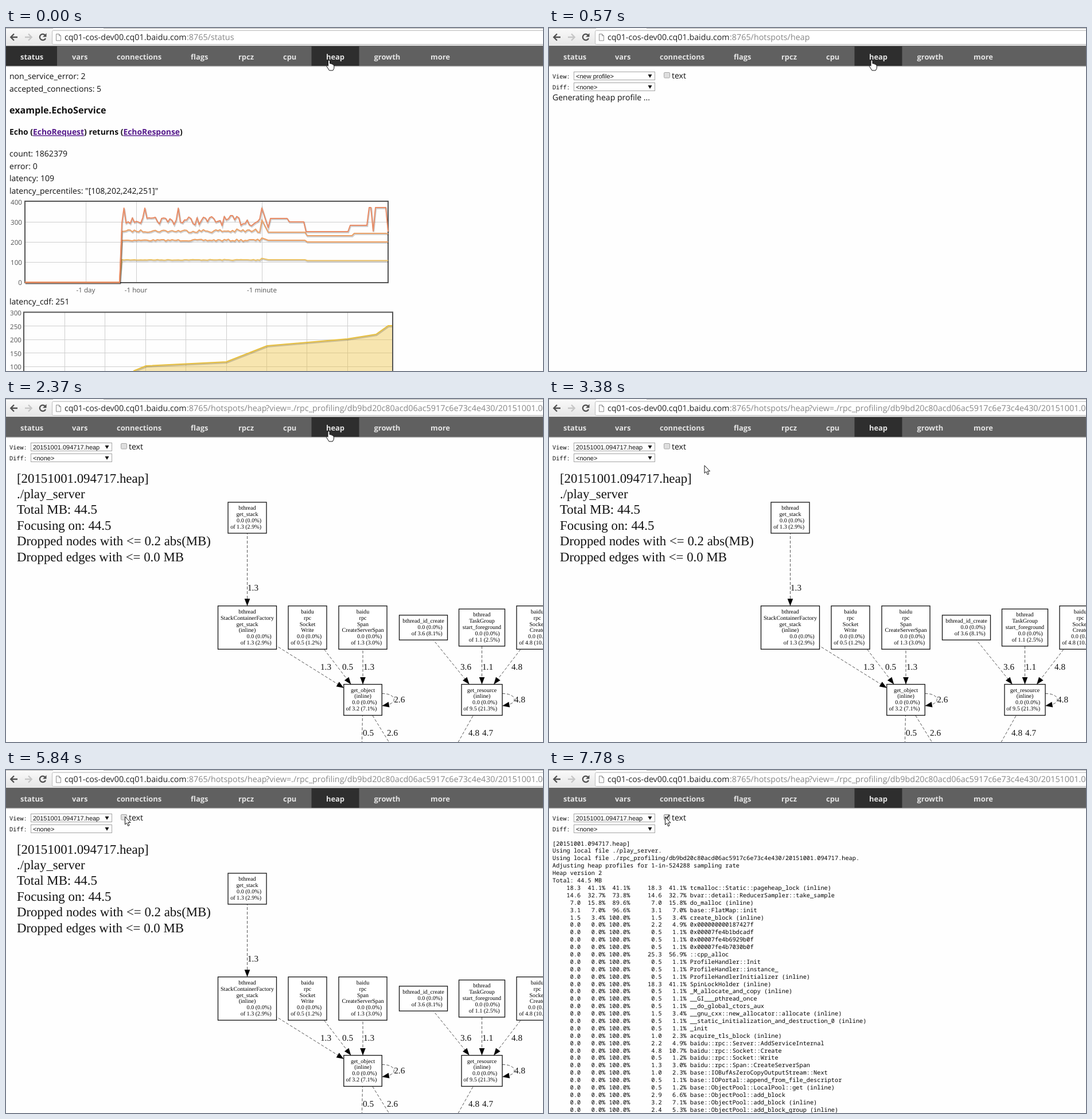
Animation, 936 px wide and 598 px high, one loop 8 s. Source, as an HTML page:

```html
<!DOCTYPE html>
<html lang="en">
<head>
<meta charset="utf-8">
<title>Heap profiler</title>
<style>
html, body { margin: 0; width: 100%; height: 100%; overflow: hidden; background: #fefefe; }
svg { position: absolute; left: 0; top: 0; }
text, pre { text-rendering: geometricPrecision; white-space: pre; }
text { font: 14.05px "Open Sans", "Noto Sans", sans-serif; fill: #111; }
text.url { font-size: 14.25px; fill: #222; }
text.path { font-size: 14.35px; fill: #868686; }
text.nav { font-size: 12.9px; font-weight: 700; fill: #e4e4e4; }
text.h3 { font-size: 16.1px; font-weight: 700; }
text.h4 { font-size: 13.9px; font-weight: 700; }
text.tick { font-size: 11.6px; fill: #545454; }
text.sel { font: 11px "Liberation Sans", Arial, sans-serif; }
text.title { font: 22.85px "Liberation Serif", Times, serif; }
text.node { font: 10.1px "Liberation Serif", Times, serif; fill: #000; }
text.edge { font: 15.2px "Liberation Serif", Times, serif; }
text.mono, pre { font: 10.25px/12.89px "Noto Sans Mono", "DejaVu Sans Mono", monospace; color: #000; }
pre { position: absolute; left: 6px; top: 122.6px; margin: 0; }
.link { fill: #551a8b; text-decoration: underline; }
.end { text-anchor: end; }
.mid { text-anchor: middle; }
</style>
</head>
<body>
<svg id="stage" width="936" height="598"></svg>
<pre id="report">[20151001.094717.heap]
Using local file ./play_server.
Using local file ./rpc_profiling/db9bd20c80acd06ac5917c6e73c4e430/20151001.094717.heap.
Adjusting heap profiles for 1-in-524288 sampling rate
Heap version 2
Total: 44.5 MB
</pre>
<svg id="top" width="936" height="598"></svg>
<script>
const $ = id => document.getElementById(id);
const text = (x, y, s, cls = '') => `<text x="${x}" y="${y}" class="${cls}">${s}</text>`;
const rect = (x, y, w, h, fill, more = '') =>
  `<rect x="${x}" y="${y}" width="${w}" height="${h}" fill="${fill}" ${more}/>`;
const path = (d, stroke, width = 1, more = '') =>
  `<path d="${d}" fill="none" stroke="${stroke}" stroke-width="${width}" ${more}/>`;
const group = (id, ...parts) => `<g id="${id}">${parts.flat().join('')}</g>`;
const poly = pts => 'M' + pts.map(p => p.map(v => +v.toFixed(1)).join(' ')).join('L');
const range = (n, f) => Array.from({ length: n }, (_, i) => f(i));

let seed = 7;
const noise = amp => {
  seed = (seed * 16807) % 2147483647;
  return (seed / 2147483647 * 2 - 1) * amp;
};

// Browser toolbar and page menu
const TABS = { status: 25, vars: 115, connections: 193, flags: 322, rpcz: 405,
  cpu: 483, heap: 558, growth: 641.5, more: 740 };
const toolbar = [
  '<linearGradient id="bar" x2="0" y2="1"><stop stop-color="#fafafa"/><stop offset="1" stop-color="#e6e6e6"/></linearGradient>',
  rect(0, 0, 936, 31, 'url(#bar)'),
  path('M0 .5H82M170 .5H936', '#b4b4b4'),
  rect(80.5, 4.5, 870, 24, '#fff', 'rx="2" stroke="#bcbcbc"'),
  path('M20 16H9M14 10.3L8.3 16l5.7 5.7', '#505050', 2.3),
  path('M33 16H44M39 10.3L44.7 16 39 21.7', '#c6c6c6', 2.3),
  group('reload', path('M68.3 12.6A5.3 5.3 0 1 0 69 18', '#505050', 2.3),
    '<path d="M70.5 9v6.5H64z" fill="#505050"/>'),
  group('stop', path('M59 11l10 10M69 11L59 21', '#505050', 2.4)),
  path('M87.5 10.5h5l3 3v8.5h-8zM92.5 10.5v3h3', '#8c8c8c'),
  text(102, 21, 'cq01-cos-dev00.cq01.baidu.com', 'url'),
  group('urlStatus', text(315, 21, ':8765/status', 'path')),
  group('urlHeap', text(315, 21, ':8765/hotspots/heap', 'path')),
  group('urlView', text(453, 21,
    '?view=./rpc_profiling/db9bd20c80acd06ac5917c6e73c4e430/20151001.094717.heap', 'path')),
  rect(0, 31, 936, 35.5, '#606060'),
  rect(0, 66.5, 936, 1, '#b8b8b8'),
  group('statusTab', rect(0, 32, 89, 34, '#2e2e2e')),
  rect(532.5, 32, 83, 34, '#2e2e2e'),
  Object.entries(TABS).map(([s, x]) => text(x, 55, s, 'nav')),
];

// Status page
const stroke = (d, color) => path(d, 'rgba(0,0,0,.18)', 3, 'transform="translate(.8 1.5)"') +
  path(d, color, 2, 'stroke-linejoin="round"');

// A noisy hour with a few peaks, then levels that each hold until shortly before the next
const series = (color, base, amp, lift, peaks, levels) => {
  const hour = range(68, i => [202 + i * 3.64,
    peaks.includes(i) ? base - lift : base + noise(amp * (.6 + i / 100))]);
  const minute = levels.flatMap(([x, y], i) =>
    i + 1 < levels.length ? [[x, y], [levels[i + 1][0] - 4, y]] : [[x, y]]);
  return stroke(poly([[33, 443.5], [198, 443.5], ...hour, ...minute]), color);
};
const grid = (xs, ys, x0, x1, y0, y1) =>
  path(xs.map(x => `M${x} ${y0}V${y1}`).join('') + ys.map(y => `M${x0} ${y}H${x1}`).join(''), '#cfcfcf');
const ticks = (x, y, top, step, gap) => range(5, i => text(x, y + i * gap, top - i * step, 'tick end'));
const frame = (x, y, w, h) => rect(x, y, w, h, 'none', 'stroke="#545454" stroke-width="2"');
const cdf = poly([[222, 598], [244, 589], [384, 582], [455, 554], [595, 542], [645, 534], [666, 519], [674, 519]]);
const status = group('status',
  text(6, 89, 'non_service_error: 2'),
  text(6, 110.5, 'accepted_connections: 5'),
  text(6, 149, 'example.EchoService', 'h3'),
  text(6, 186, 'Echo (<tspan class="link">EchoRequest</tspan>) returns (<tspan class="link">EchoResponse</tspan>)', 'h4'),
  ['count: 1862379', 'error: 0', 'latency: 109', 'latency_percentiles: "[108,202,242,251]"']
    .map((s, i) => text(6, 224 + i * 21.5, s)),
  grid([139.5, 227.5, 446.5], range(3, i => 338.5 + i * 35), 33, 666, 302, 444),
  frame(33, 302, 633, 142),
  ticks(28, 307.5, 400, 100, 35.2),
  text(139, 460.5, '-1 day', 'tick mid'),
  text(226.5, 460.5, '-1 hour', 'tick mid'),
  text(446, 460.5, '-1 minute', 'tick mid'),
  series('#e9c066', 404.2, .7, 2.7, [67], [[457, 404], [525, 405.5], [666, 405.5]]),
  series('#eda062', 370, 1.6, 4, [67], [[457, 370], [525, 373], [666, 373]]),
  series('#eba26a', 353.8, 3, 19, [67], [[457, 356], [525, 362], [607, 358], [666, 359]]),
  series('#e98c66', 336, 8, 22, [1, 11, 27, 67], [[457, 348], [461, 332], [494, 338], [523, 355],
    [600, 344], [633, 313], [640, 354], [644, 313], [666, 355]]),
  text(6, 482, 'latency_cdf: 251'),
  grid(range(8, i => Math.round(102 + i * 70.4) + .5), range(4, i => Math.round(519 + i * 23.6) + .5), 31, 674, 495, 598),
  `<path d="${cdf}V598z" fill="#edc240" fill-opacity=".42"/>`,
  stroke(cdf, '#e8c040'),
  frame(31, 495.5, 643, 140),
  ticks(27, 501, 300, 50, 23.5));

// Profile controls
const select = y => rect(43.5, y + .5, 141, 14, '#fff', 'stroke="#a4a4a4"') +
  `<path d="M172.5 ${y + 5}h7l-3.5 6z" fill="#111"/>`;
const controls = group('controls',
  text(6, 87.5, 'View:', 'mono'), text(6, 106.5, 'Diff:', 'mono'),
  select(76), select(95),
  group('newProfile', text(47, 88, '&lt;new profile&gt;', 'sel')),
  group('oldProfile', text(47, 88, '20151001.094717.heap', 'sel')),
  text(47, 107, '&lt;none&gt;', 'sel'),
  rect(200.5, 77.5, 10, 9.5, '#dedede', 'id="box" rx="1.5" stroke="#a6a6a6"'),
  group('check', path('M202.5 82l2.5 3 4.5-6.5', '#333', 2)),
  text(214, 87.5, 'text'));

// Call graph: boxes grow with their lines, edges run from centre to centre
const node = (x, y, w, label, share) => {
  const names = label.split(' ');
  const h = (names.length + 2) * 10.75 + 11;
  const line = i => (y - h / 2 + 13 + i * 10.9).toFixed(1);
  const right = x + w / 2 - 9;
  const svg = rect(x - w / 2, y - h / 2, w, h, '#fff', 'stroke="#111" stroke-width="1.3"') +
    names.map((s, i) => text(x, line(i), s, 'node mid')).join('') +
    text(right, line(names.length), '0.0 (0.0%)', 'node end') +
    text(right, line(names.length + 1), `of ${share}`, 'node end');
  return { x, y, w, h, svg };
};
const head = (x, y, angle) =>
  `<path d="M0 0L-12.5 4.8V-4.8z" transform="translate(${x} ${y}) rotate(${angle})"/>`;
const dash = d => path(d, '#555', 1, 'stroke-dasharray="5 3"');
const edge = (a, b, label, lx, ly = 472) => {
  const dx = b.x - a.x, dy = b.y - a.y;
  const cut = Math.min(b.w / 2 / Math.abs(dx), b.h / 2 / Math.abs(dy));
  const x = b.x - dx * cut, y = b.y - dy * cut;
  return dash(poly([[a.x, a.y], [x, y]])) + text(lx, ly, label, 'edge') +
    head(x, y, Math.atan2(dy, dx) * 180 / Math.PI);
};
const loop = ({ x, y, w }, label) => {
  const side = x + w / 2;
  return dash(`M${side} ${y - 11}c12 0 21 4 21 10.5 0 4-4 7-10 9`) +
    head(side, y + 10.5, 170) + text(side + 21, y + 4.5, label, 'edge');
};
const below = x => ({ x, y: 620, w: 0, h: 0 });

const ROW = 398.5;
const stack = node(420.5, 207, 67, 'bthread get_stack', '1.3 (2.9%)');
const factory = node(420.5, ROW, 102, 'bthread StackContainerFactory get_stack (inline)', '1.3 (2.9%)');
const write = node(525.5, ROW, 67, 'baidu rpc Socket Write', '0.5 (1.2%)');
const span = node(622, ROW, 84, 'baidu rpc Span CreateServerSpan', '1.3 (3.0%)');
const idCreate = node(727.5, ROW, 84, 'bthread_id_create', '3.6 (8.1%)');
const task = node(829.5, ROW, 80, 'bthread TaskGroup start_foreground', '1.1 (2.5%)');
const create = node(926, ROW, 72, 'baidu rpc Socket Create', '4.8 (10.7%)');
const object = node(622, 524.5, 66.5, 'get_object (inline)', '3.2 (7.1%)');
const resource = node(829.5, 524.5, 71, 'get_resource (inline)', '9.5 (21.3%)');
const graph = group('graph',
  ['[20151001.094717.heap]', './play_server', 'Total MB: 44.5', 'Focusing on: 44.5',
    'Dropped nodes with &lt;= 0.2 abs(MB)', 'Dropped edges with &lt;= 0.0 MB']
    .map((s, i) => text(19, 145.5 + i * 27.48, s, 'title')),
  edge(stack, factory, '1.3', 421, 334),
  edge(factory, object, '1.3', 548),
  edge(write, object, '0.5', 586),
  edge(span, object, '1.3', 623),
  edge(idCreate, resource, '3.6', 792),
  edge(task, resource, '1.1', 830),
  edge(create, resource, '4.8', 881),
  loop(object, '2.6'), loop(resource, '4.8'),
  edge(object, below(620), '0.5', 622, 587),
  edge(object, below(681), '2.6', 664, 587),
  edge(resource, below(776), '4.8', 806, 587),
  edge(resource, below(829.5), '4.7', 830, 587),
  [stack, factory, write, span, idCreate, task, create, object, resource].map(n => n.svg));

// Text report: cumulative MB, percent and symbol, or the smallest share when only a symbol is given
const ROWS = `18.3 41.1 tcmalloc::Static::pageheap_lock (inline)
14.6 32.7 bvar::detail::ReducerSampler::take_sample
7.0 15.8 do_malloc (inline)
3.1 7.0 base::FlatMap::init
1.5 3.4 create_block (inline)
2.2 4.9 0x000000000187427f
0x00007fe4b1bdcadf
0x00007fe4b6929b0f
0x00007fe4b7030b0f
25.3 56.9 ::cpp_alloc
ProfileHandler::Init
ProfileHandler::instance_
ProfileHandlerInitializer (inline)
18.3 41.1 SpinLockHolder (inline)
_M_allocate_and_copy (inline)
__GI___pthread_once
__do_global_ctors_aux
1.5 3.4 __gnu_cxx::new_allocator::allocate (inline)
__static_initialization_and_destruction_0 (inline)
_init
1.0 2.3 acquire_tls_block (inline)
2.2 4.9 baidu::rpc::Server::AddServiceInternal
4.8 10.7 baidu::rpc::Socket::Create
0.5 1.2 baidu::rpc::Socket::Write
1.3 3.0 baidu::rpc::Span::CreateServerSpan
1.0 2.3 base::IOBufAsZeroCopyOutputStream::Next
base::IOPortal::append_from_file_descriptor
0.5 1.2 base::ObjectPool::LocalPool::get (inline)
2.9 6.6 base::ObjectPool::add_block
3.2 7.1 base::ObjectPool::add_block (inline)
2.4 5.3 base::ObjectPool::add_block_group (inline)`;
let sum = 0;
$('report').textContent += ROWS.split('\n').map(row => {
  const [, mb = '0.5', pct = '1.1', name] = row.match(/^(?:(\d+\.\d) (\d+\.\d) )?(.*)$/);
  const own = sum < 99.9;   // the first rows hold all the memory themselves
  if (own) sum += +pct;
  const p = v => (v + '%').padStart(6);
  return [(own ? mb : '0.0').padStart(8), p(own ? pct : '0.0'), p(sum.toFixed(1)),
    mb.padStart(8), p(pct), name].join(' ');
}).join('\n');

$('stage').innerHTML = toolbar.flat().join('') + status + controls + graph +
  group('wait', text(6, 125.5, 'Generating heap profile ...'));

const shape = (id, d) => `<path id="${id}" d="${d}" fill="#fff" stroke="#111" stroke-linejoin="round"/>`;
$('top').innerHTML =
  shape('hand', 'M3.5 2q1.5-2 3 0v5q3-.5 3.5 1 2-.3 2.3 1.2 1.5 0 1.5 2v4l-2 3.8H5.5L1 11.8q-.5-2 1.5-1.5l1 1z') +
  shape('arrow', 'M.5.5V14l3-2.7 2.2 5.2 2.3-1-2.2-5H10z') +
  path('M0 .5h2.5l1 1 1-1H7M3.5 1.5v13M0 15.5h2.5l1-1 1 1H7', '#111', 1, 'id="beam"');

// Pointer moves slow down towards their end and are seen in steps
const MOVES = [
  { start: 3020, steps: 5, ms: 120, from: [520, 70], to: [223, 124] },
  { start: 3770, steps: 3, ms: 150, from: [217, 108], to: [210.5, 86] },
  { start: 5840, steps: 1, ms: 120, from: [207, 81], to: [202, 81.5] },
];
function pointer(t) {
  const move = MOVES.filter(m => t >= m.start).pop();
  if (!move) return [t < 120 ? 558 : 557.5, 55];
  const { start, steps, ms, from, to } = move;
  const f = Math.min(1, Math.floor((t - start) / ms) / steps);
  return from.map((v, i) => v + (to[i] - v) * (1 - (1 - f) ** 2));
}

const show = (id, on) => { $(id).style.display = on ? '' : 'none'; };

function draw(t) {
  const within = (a, b) => t >= a && t < b;
  const loading = within(260, 570) || within(6500, 6620);
  show('reload', !loading);
  show('stop', loading);
  show('urlStatus', t < 260);
  show('urlHeap', t >= 260);
  show('urlView', t >= 1840);
  show('statusTab', t < 570);
  show('status', t < 570);
  show('controls', t >= 570);
  show('newProfile', t < 2370);
  show('oldProfile', t >= 2370);
  show('wait', within(570, 2370) || within(6620, 7780));
  show('graph', within(2370, 6620));
  show('report', t >= 7780);
  show('check', t >= 6370);
  $('box').setAttribute('stroke', t >= 6220 ? '#8a8a8a' : '#a6a6a6');
  const kind = t < 3020 ? 'hand' : within(3620, 3770) ? 'beam' : 'arrow';
  for (const id of ['hand', 'arrow', 'beam']) show(id, id === kind);
  $(kind).setAttribute('transform', `translate(${pointer(t)})`);
}

let start;
function tick(now) {
  start ??= now;
  draw((now - start) % 8000);
  requestAnimationFrame(tick);
}
draw(0);
requestAnimationFrame(tick);
</script>
</body>
</html>
```
